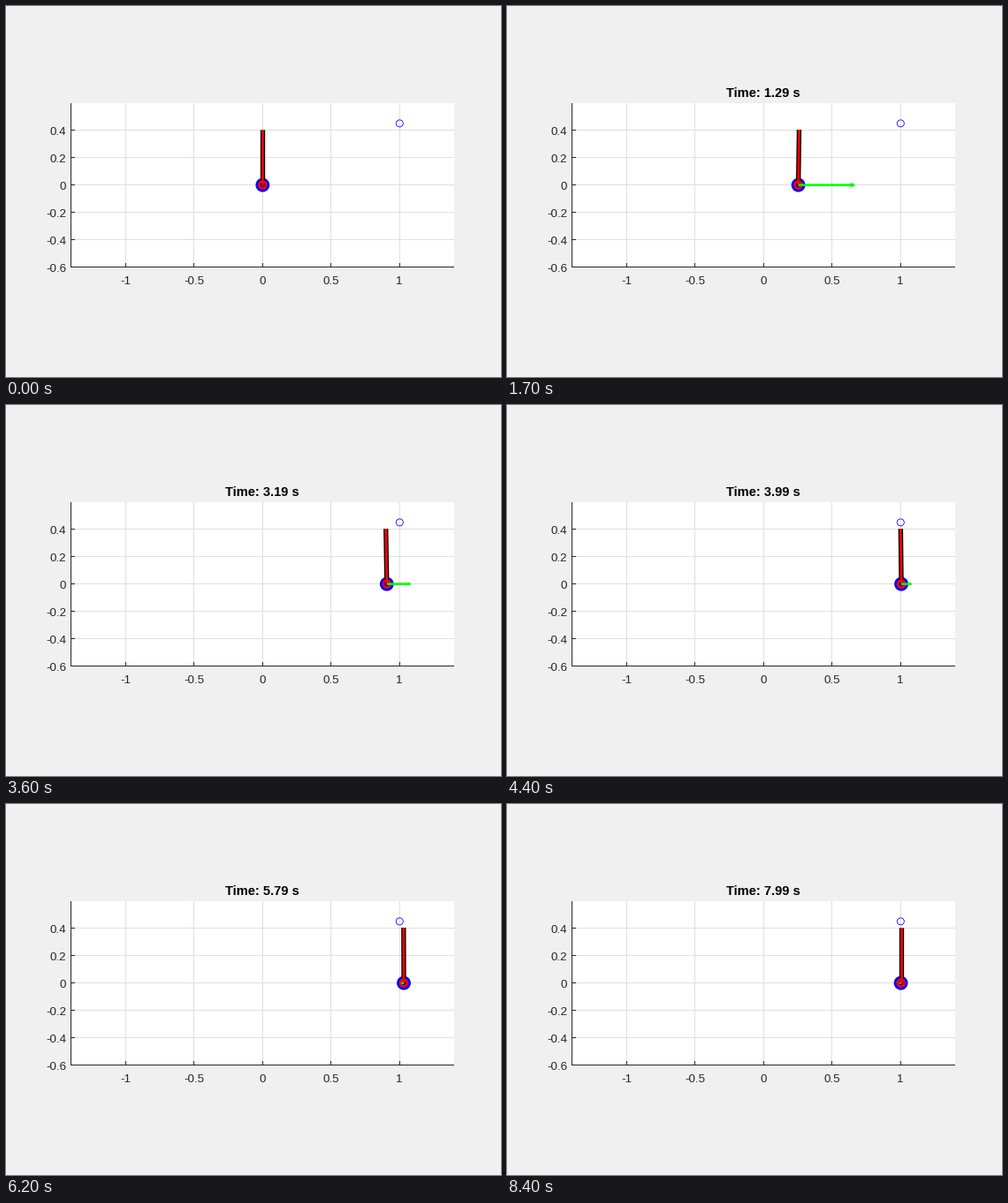
Animation, 560 px wide and 420 px high, one loop 8.5 s. Source, as a matplotlib script:

```python
import numpy as np
import matplotlib.pyplot as plt
from matplotlib.animation import FuncAnimation
from matplotlib.patches import Circle, Rectangle

W, H, DPI = 560, 420, 100
PT = 72 / DPI              # points per pixel
X0, Y0, SCALE = 290.3, 202.65, 155
INK = "#262626"
HOLD = 5                   # opening slots before the run starts
FRAMES = 85

plt.rcParams["font.family"] = "Liberation Sans"
fig = plt.figure(figsize=(W / DPI, H / DPI), dpi=DPI, facecolor="#f0f0f0")
ax = fig.add_axes([0, 0, 1, 1])
ax.set_xlim(0, W)
ax.set_ylim(H, 0)
ax.axis("off")


def px(x):
    return X0 + SCALE * x


def py(y):
    return Y0 - SCALE * y


def box(x, y, w, h, color, z=1):
    ax.add_patch(Rectangle((x, y), w, h, fc=color, lw=0, aa=False, zorder=z))


def label(x, y, s, size=13.33, **kw):
    return ax.text(x, y, s, fontsize=size * PT, va="baseline", **kw)


def stroke(color, width, z):
    return ax.plot([], [], color=color, lw=width * PT, zorder=z,
                   solid_capstyle="butt", solid_joinstyle="round")[0]


def ring(x, y, r, width, color, z, fill="none"):
    return ax.add_patch(Circle((x, y), r, fc=fill, ec=color, lw=width * PT, zorder=z))


# Static plot area
LEFT, RIGHT, TOP, BOTTOM = 73, 507, 110, 295
box(LEFT, TOP, RIGHT - LEFT, BOTTOM + 1 - TOP, "white", 0)
for v in (-1, -0.5, 0, 0.5, 1):
    col = int(px(v))
    box(col, TOP, 1, BOTTOM - TOP, "#dfdfdf")
    box(col, BOTTOM - 4, 1, 4, INK, 2)
    label(px(v) - 0.3, 315, f"{v:g}", ha="center", color=INK)
for v in (0.4, 0.2, 0, -0.2, -0.4, -0.6):
    row = int(py(v))
    if row < BOTTOM:
        box(LEFT, row, RIGHT - LEFT, 1, "#dfdfdf")
        box(LEFT, row, 5, 1, INK, 2)
    label(68, row + 6, f"{v:g}", ha="right", color=INK)
box(LEFT, TOP, 1, BOTTOM + 1 - TOP, INK, 2)
box(LEFT, BOTTOM, RIGHT - LEFT, 1, INK, 2)
ring(px(1), py(0.45), 4, 0.8, "blue", 3)

# Moving parts
wheel = ring(X0, Y0, 6.4, 3, "blue", 4, "blue")
hub = ring(X0, Y0, 3.9, 2.67, "red", 7)
rod = stroke("black", 5.33, 5)
core = stroke("red", 2.67, 6)
arrow = stroke("lime", 2.67, 8)
title = label(X0, 103, "", 14.67, ha="center", weight="bold", color="black")

# Time, position and speed at key moments of the run
T = np.array([0, 1.29, 2.39, 3.19, 4.79, 6.79, 7.99])
P = np.array([0, 0.2535, 0.70, 0.9065, 1.035, 1.0148, 1.002])
V = np.array([0, 0.435, 0.335, 0.18, 0.008, -0.014, -0.007])
LEAN_T = [0, 0.35, 1.29, 2.39, 3.19, 4.79, 6.79]
LEAN = [0, 0.025, 0.014, -0.018, -0.017, -0.006, 0]


def motion(t):
    """Position and speed from cubic Hermite segments."""
    i = min(np.searchsorted(T, t, side="right") - 1, len(T) - 2)
    h = T[i + 1] - T[i]
    s = (t - T[i]) / h
    d = P[i + 1] - P[i]
    a, b = V[i] * h, V[i + 1] * h
    x = P[i] + a * s + (3 * d - 2 * a - b) * s**2 + (a + b - 2 * d) * s**3
    v = (a + 2 * (3 * d - 2 * a - b) * s + 3 * (a + b - 2 * d) * s**2) / h
    return x, v


def draw(n):
    running = n >= HOLD
    t = 0.09 + 0.1 * (n - HOLD) if running else 0
    x, v = motion(t)
    lean = np.interp(t, LEAN_T, LEAN)
    cx = px(x)
    wheel.center = hub.center = (cx, Y0)
    for part in (rod, core):
        part.set_data([cx, px(x + 0.4 * np.sin(lean))],
                      [Y0, py(0.4 * np.cos(lean)) - 0.6])
    size = 0.93 * v * SCALE
    if running:
        tip, back = cx + size, cx + 0.94 * size
        wing = 0.02 * size
        arrow.set_data([cx, tip, np.nan, back, tip, back],
                       [Y0, Y0, np.nan, Y0 - wing, Y0, Y0 + wing])
    else:
        arrow.set_data([], [])
    title.set_text(f"Time: {t:.2f} s" if running else "")
    return wheel, hub, rod, core, arrow, title


anim = FuncAnimation(fig, draw, frames=FRAMES, interval=100, repeat=True,
                     repeat_delay=0, blit=False)
plt.show()
```
